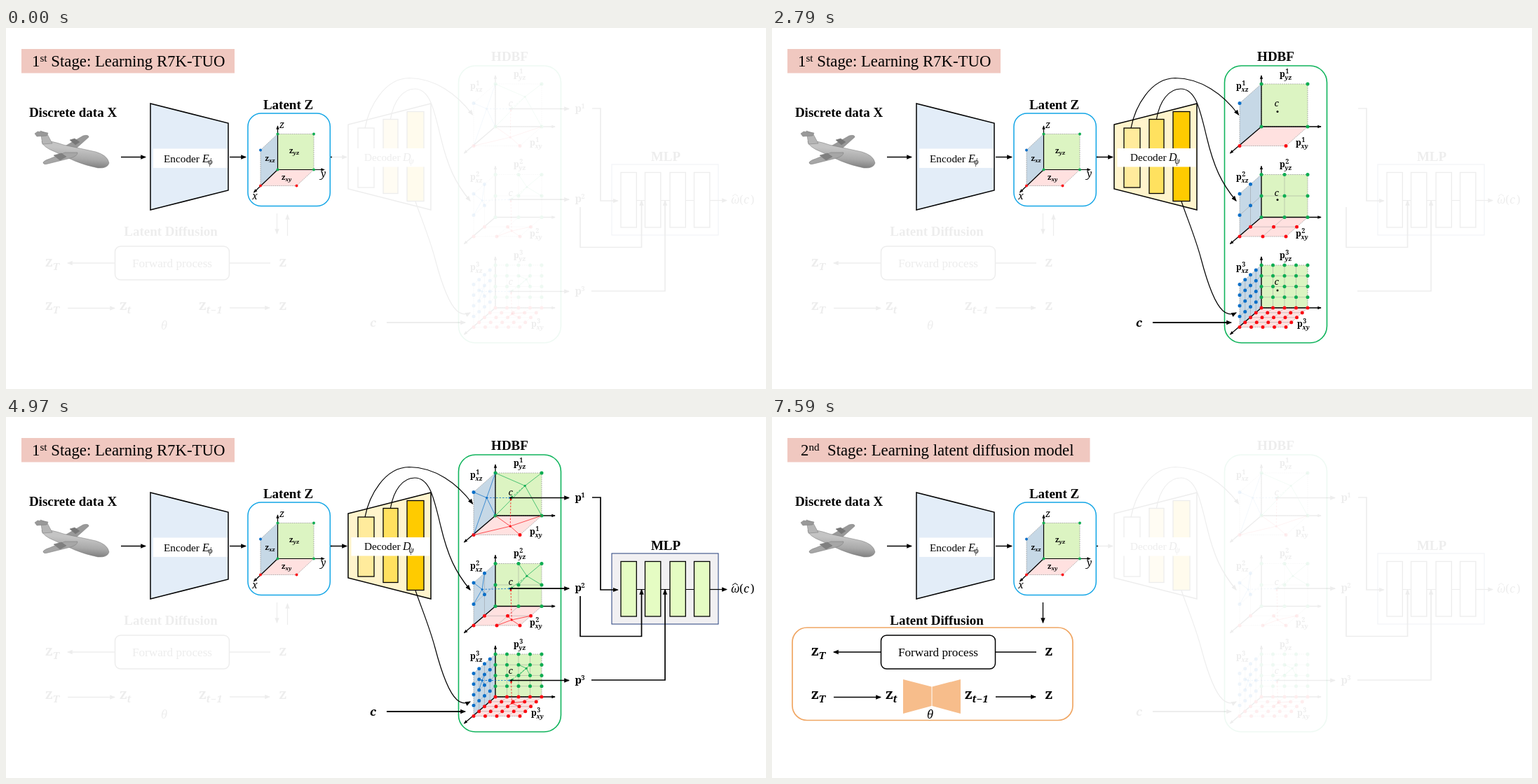
Write an HTML page that moves like this. It is 1084 px wide and 516 px high and loops after 8 s.

```html
<!DOCTYPE html>
<html lang="en">
<head>
<meta charset="utf-8">
<title>Two-stage training diagram</title>
<style>
  html, body { margin: 0; width: 100%; height: 100%; overflow: hidden; background: #fff; }
  svg { display: block; width: 100vw; height: 100vh; }
  text { font-family: "Liberation Serif", "Times New Roman", serif; white-space: pre; }
  .math { font-family: "Noto Serif", serif; }
  .bold { font-weight: bold; }
  .it { font-style: italic; }
  .hidden { display: none; }
  .ghost { opacity: 0.065; }
  .ghost .tint { fill: #fff; }
</style>
</head>
<body>
<svg id="stage" viewBox="0 0 1084 516"></svg>
<script>
const STARTS = [0, 1050, 2140, 3230, 4320, 5410, 7590];
const LOOP = 8000;
const STATES = { 0: 'hidden', 1: 'shown', g: 'ghost' };
const BLUE = '#0b6fc8', GREEN = '#0fad52', RED = '#fb0d14';
const svg = document.getElementById('stage');
const layers = [];
let target = svg;

function el(tag, attrs, text) {
  const node = document.createElementNS('http://www.w3.org/2000/svg', tag);
  for (const key in attrs) node.setAttribute(key, attrs[key]);
  if (text) node.textContent = text;
  target.appendChild(node);
  return node;
}

// One character per phase, a key of STATES.
function layer(phases, draw) {
  target = svg;
  target = el('g');
  layers.push({ node: target, phases });
  draw();
}

const path = (d, stroke = '#000', width = 1.2, extra = {}) =>
  el('path', { d, fill: 'none', stroke, 'stroke-width': width, ...extra });
const arrow = (d, width = 1.5, head = 'big', stroke = '#000', extra = {}) =>
  path(d, stroke, width, { 'marker-end': `url(#${head})`, ...extra });
const poly = (points, fill, stroke = 'none', width = 1.5, extra = {}) =>
  el('polygon', { points: points.join(' '), fill, stroke, 'stroke-width': width, ...extra });
const box = (x, y, width, height, fill, stroke = 'none', weight = 1.5, rx = 0) =>
  el('rect', { x, y, width, height, fill, stroke, 'stroke-width': weight, rx });
const tint = node => node.classList.add('tint');
const dot = ([cx, cy], fill, r = 2.5) => el('circle', { cx, cy, r, fill });
const text = (x, y, size, str, cls = '', anchor = 'start') =>
  el('text', { x, y, 'font-size': size, class: cls, 'text-anchor': anchor }, str);
const heading = (x, y, str) => text(x, y, 19, str, 'bold', 'middle');

function banner(width, x, number, suffix, rest) {
  box(22, 30, width, 34.5, '#f0c8c0');
  const label = text(x, 55, 22.8, number);
  target = label;
  el('tspan', { dy: -7, 'font-size': 15.2 }, suffix);
  el('tspan', { dy: 7 }, rest);
}

function symbol(x, y, size, base, sub, style = 'math bold') {
  text(x, y, size, base, style);
  text(x + size * 0.53, y + size * 0.23, size * 0.72, sub, style + ' it');
}

function planeLabel(x, y, level, sub) {
  text(x, y, 12, 'p', 'math bold');
  text(x + 8.5, y - 5, 8.5, level, 'math bold');
  text(x + 7.5, y + 4, 8.5, sub, 'math bold it');
}

// Maps unit coordinates of the three planes to the stage.
function makeCube(ox, oy, w, h, dx, dy, n) {
  return {
    ox, oy, n,
    yz: (a, b) => [ox + w * a, oy - h * b],
    xz: (t, b) => [ox - dx * t, oy + dy * t - h * b],
    xy: (t, a) => [ox + w * a - dx * t, oy + dy * t],
  };
}

function drawCube(cube, tips, r, weight) {
  const { ox, oy, n } = cube;
  const fills = { xz: '#c6d8e6', yz: '#dcf4c2', xy: '#ffe1e0' };
  for (const name in fills) {
    const at = cube[name];
    tint(poly([at(0, 0), at(1, 0), at(1, 1), at(0, 1)], fills[name], '#999', 0.7, { 'stroke-dasharray': '2 1' }));
    for (let i = 1; i < n; i++) {
      const k = i / n;
      path(`M${at(k, 0)}L${at(k, 1)}M${at(0, k)}L${at(1, k)}`, '#888', 0.4);
    }
  }
  arrow(`M${ox} ${oy}V${tips.up}`, weight, 'small');
  arrow(`M${ox} ${oy}H${tips.right}`, weight, 'small');
  arrow(`M${ox} ${oy}L${tips.diagonal}`, weight, 'small');
  for (let i = 0; i <= n; i++) {
    for (let j = 0; j <= n; j++) {
      const u = i / n, v = j / n;
      dot(cube.yz(u, v), n === 4 && j === 0 ? RED : GREEN, r);
      if (i && j) dot(cube.xz(u, v), BLUE, r);
      if (i) dot(cube.xy(u, v), RED, r);
    }
  }
}

// Joins a sample to the corners of its grid cell and projects it to c.
function interpolate(cube, name, u, v, color, head, c) {
  const at = cube[name], n = cube.n, p = at(u, v);
  const low = k => Math.floor(k * n) / n;
  for (const i of [0, 1 / n])
    for (const j of [0, 1 / n])
      path(`M${p}L${at(low(u) + i, low(v) + j)}`, color, 0.7);
  dot(p, color, 1.5);
  arrow(`M${p}L${c}`, 0.8, head, color, { 'stroke-dasharray': '2.5 2' });
}

const defs = target = el('defs');
const heads = [['big', 8, '#000'], ['small', 5.5, '#000'], ['red', 4, RED], ['blue', 4, BLUE], ['green', 4, GREEN]];
for (const [id, size, fill] of heads) {
  target = defs;
  target = el('marker', { id, viewBox: '0 0 10 10', refX: 8.5, refY: 5, markerWidth: size, markerHeight: size, markerUnits: 'userSpaceOnUse', orient: 'auto' });
  el('path', { d: 'M0 1L10 5L0 9Z', fill });
}
target = defs;
target = el('linearGradient', { id: 'metal', x1: 0.55, y1: 0.1, x2: 0.4, y2: 1 });
el('stop', { offset: 0.2, 'stop-color': '#c4c4c4' });
el('stop', { offset: 0.6, 'stop-color': '#a9a9a9' });
el('stop', { offset: 1, 'stop-color': '#757575' });

function airplane() {
  const part = (d, fill) => path(d, '#777', 0.5, { fill });
  part('M84 169L110 154Q118 152 118 156L99 173Z', '#999');
  part('M91 160L98 158L105 163L99 167Z', '#777');
  part('M51 162Q62 160 82 167L128 177Q145 182 147 193Q145 201 131 200Q112 196 98 190L70 177Q52 170 51 162Z', 'url(#metal)');
  part('M49 147L58 150L66 165L52 166Z', '#b5b5b5');
  part('M41 151L45 148L60 150L58 154L44 155Z', '#999');
  part('M84 178L102 178Q102 183 92 186L60 194Q53 196 53 192Q55 189 62 187Z', '#a6a6a6');
  part('M68 182L79 179L86 184L77 189Z', '#808080');
}

const cubes = [141, 270.5, 400].map((oy, i) => makeCube(698, oy, 66, 61, 31, 27.5, 2 ** i));
const queries = [[720, 115.5], [720, 245.2], [720.5, 376.5]];

layer('1111100', () => banner(304, 37, '1', 'st', ' Stage: Learning R7K-TUO'));
layer('0000011', () => banner(431.5, 41, '2', 'nd', '  Stage: Learning latent diffusion model'));

layer('1111111', () => {
  heading(95.5, 127, 'Discrete data X');
  airplane();
  arrow('M164 184.5H199');
  poly([[206, 108], [317, 136], [317, 232], [206, 260]], '#e3edf8', '#000');
  box(210, 172.5, 106, 27.5, '#fff');
  text(225, 191.5, 15.3, 'Encoder');
  symbol(280, 191.5, 16, 'E', 'ϕ', 'it');
  arrow('M319 184.5H342');
  heading(402.5, 116, 'Latent Z');
  box(345, 122, 117.3, 132.5, '#fff', '#12a5e6', 1.5, 19);
  drawCube(makeCube(387.5, 202.5, 51.5, 51, 24.5, 23, 1), { up: 140, right: 454, diagonal: [353.5, 235] }, 2, 1.2);
  text(390, 143, 14, 'z', 'math it');
  text(449, 213, 14, 'y', 'math it');
  text(351, 245, 14, 'x', 'math it');
  symbol(404, 179, 10.5, 'z', 'yz');
  symbol(369.5, 190, 10.5, 'z', 'xz');
  symbol(393, 217, 10.5, 'z', 'xy');
  path('M463 184.5H465', '#000', 1.5);
});

layer('g1111gg', () => {
  arrow('M463 184.5H486');
  tint(poly([[488, 138], [606, 108], [606, 260], [488, 230]], '#fff4cc', '#000'));
  tint(box(502, 143, 23, 85, '#ffeb9c', '#000', 1.3));
  box(538, 130.5, 21, 106, '#ffe15f', '#000', 1.3);
  box(572, 119.5, 24, 128, '#ffcb00', '#000', 1.3);
  box(492.5, 172, 112, 26.5, '#fff');
  text(511, 190, 15.2, 'Decoder');
  symbol(566, 190, 16, 'D', 'ψ', 'it');
  heading(718.5, 47, 'HDBF');
  box(645.5, 54, 146, 396, '#fff', '#10b45c', 1.6, 24);
  cubes.forEach((cube, i) => {
    const { oy } = cube;
    drawCube(cube, { up: oy - 73, right: 783, diagonal: [653.5, oy + 38] }, 2.5, 1.3);
    planeLabel(662, oy - 54, i + 1, 'xz');
    planeLabel(724, oy - 71.5, i + 1, 'yz');
    planeLabel(i < 2 ? 747 : 749, oy + 27, i + 1, 'xy');
  });
  arrow('M512 143C518 112 540 72 575 71.5C612 72 643 94 665.5 124', 1.2);
  arrow('M548.5 130C553 104 566 87 583 87C604 87 610 114 620 156C630 198 641 222 662 247', 1.2);
  arrow('M584 248C594 277 604 300 612 330C622 368 632 394 643 404C650 410 656 410 662 407', 1.2);
});

layer('g0111gg', () => {
  text(519, 427, 17, 'c', 'math bold it');
  arrow('M543 421H655', 2);
  [112, 239.5, 367].forEach(y => text(716.5, y, 13, 'c', 'math it'));
});

layer('0010000', () => [119.5, 245.5, 375].forEach(y => dot([721, y], '#000', 1.5)));

layer('g0011gg', () => {
  const samples = [
    { yz: [0.64, 0.7], xz: [0.4, 0.6], xy: [0.55, 0.58] },
    { yz: [0.68, 0.71], xz: [0.61, 0.67], xy: [0.71, 0.685] },
    { yz: [0.67, 0.67], xz: [0.61, 0.66], xy: [0.33, 0.51] },
  ];
  cubes.forEach((cube, i) => {
    const c = queries[i], s = samples[i];
    interpolate(cube, 'yz', ...s.yz, GREEN, 'green', c);
    interpolate(cube, 'xz', ...s.xz, BLUE, 'blue', c);
    interpolate(cube, 'xy', ...s.xy, RED, 'red', c);
    dot(c, '#000', 1.5);
    arrow(`M${c}H803`, 1.7);
    text(811.5, c[1] + 4, 14.5, 'p', 'math bold');
    text(820.5, c[1] - 1, 9, i + 1, 'math bold');
  });
});

layer('gggg1gg', () => {
  heading(941, 190, 'MLP');
  tint(box(864, 195, 152, 101, '#f1f0f2', '#243f7d', 1));
  for (const x of [877, 911.5, 947, 981.5]) tint(box(x, 206.5, 22.3, 78.5, '#e5fcc3', '#000', 1.3));
  path('M899.5 246.5H911.5M934 246.5H947M969.5 246.5H981.5', '#000', 1.2);
  arrow('M1004 246.5H1028', 1.2);
  arrow('M836 115H848V247H872.5', 1.7);
  arrow('M819 256V313.5H906.5V247', 1.7);
  arrow('M835 376H940V247', 1.7);
  text(1034, 251, 16, 'ω', 'math it');
  path('M1036 240.5L1040 237.5L1044 240.5', '#000', 1);
  text(1046, 251, 16, '(', 'math');
  text(1052, 251, 16, 'c', 'math it');
  text(1062, 251, 16, ')', 'math');
});

layer('0000001', () => {
  box(29, 301, 400, 132.5, '#fff', '#f0a663', 1.7, 21);
  poly([[187, 375], [227.5, 385.5], [227.5, 413], [187, 424]], '#f7bd8b');
  poly([[269, 375], [228.5, 385.5], [228.5, 413], [269, 424]], '#f7bd8b');
});

layer('gggggg1', () => {
  heading(235, 297, 'Latent Diffusion');
  arrow('M386.5 265V294', 1.3);
  path('M377 336H319', '#000', 1.5);
  arrow('M155 336H88');
  box(155.5, 312, 163, 48, '#fff', '#000', 1.5, 8);
  text(237, 342, 17.2, 'Forward process', '', 'middle');
  symbol(56, 341, 20, 'z', 'T');
  text(389.5, 341, 20, 'z', 'math bold');
  symbol(56, 403, 20, 'z', 'T');
  arrow('M88 400.5H155');
  symbol(162, 403, 20, 'z', 't');
  symbol(275, 403, 20, 'z', 't−1');
  arrow('M319 400H376');
  text(389.5, 403, 20, 'z', 'math bold');
  text(221, 431, 16, 'θ', 'math it');
});

layer('gggggg0', () => arrow('M401.5 297V267', 1.3));

function render() {
  const time = performance.now() % LOOP;
  const phase = STARTS.filter(start => start <= time).length - 1;
  for (const { node, phases } of layers) node.setAttribute('class', STATES[phases[phase]]);
  requestAnimationFrame(render);
}
render();
</script>
</body>
</html>
```
